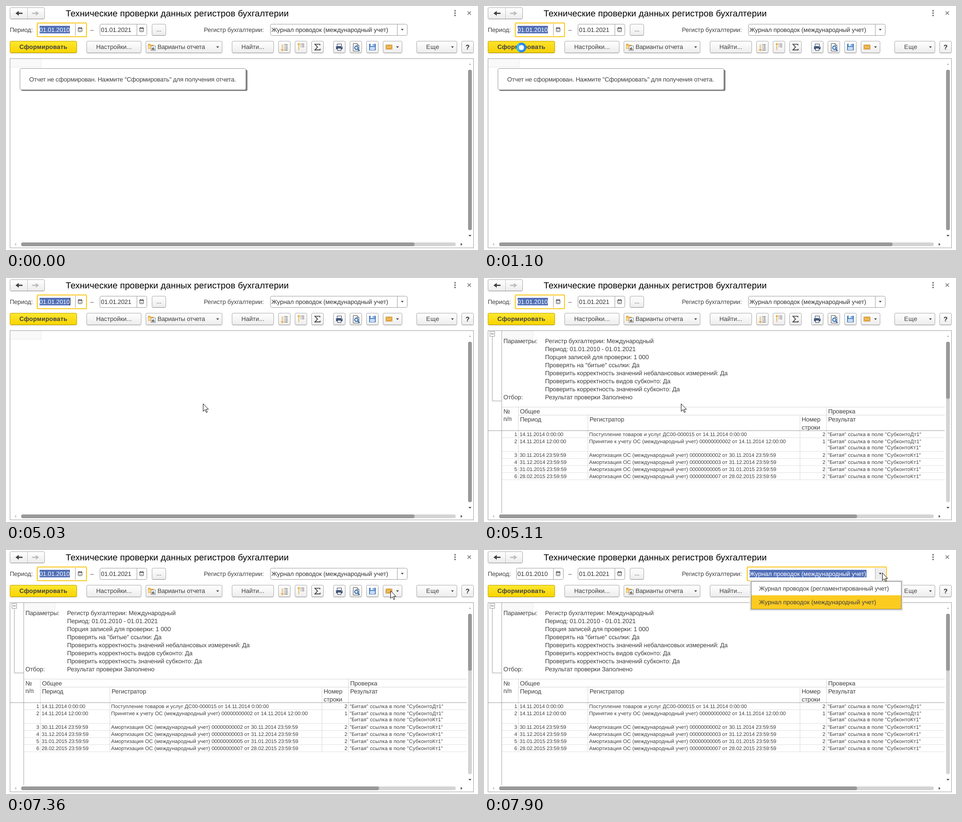
These frames come from a looping animation (997x517 px, 8000 ms). An HTML page:

```html
<!DOCTYPE html>
<html lang="ru">
<head>
<meta charset="utf-8">
<style>
html, body { margin: 0; width: 100%; height: 100%; overflow: hidden; background: #fff; }
svg { display: block; width: 997px; height: 517px; }
text { font-family: "Liberation Sans", Arial, sans-serif; font-size: 13px; fill: #404040; text-rendering: geometricPrecision; white-space: pre; }
</style>
</head>
<body>
<svg id="stage" viewBox="0 0 997 517" xmlns="http://www.w3.org/2000/svg"></svg>
<script>
const LOOP = 8000;
const JOURNAL = 'Журнал проводок (международный учет)';
const stage = document.getElementById('stage');

// Drawing helpers: each returns markup
const text = (x, y, s, { size = 13, ls = -0.1, anchor = 'start', fill = '#404040', bold = false } = {}) =>
  `<text x="${x}" y="${y}" text-anchor="${anchor}" letter-spacing="${ls}" style="font-size:${size}px;fill:${fill}${bold ? ';font-weight:700' : ''}">${s}</text>`;
const box = (x, y, x2, y2, fill, r = 0) =>
  `<rect x="${x}" y="${y}" width="${x2 - x}" height="${y2 - y}" rx="${r}" fill="${fill}"/>`;
const frame = (x, y, x2, y2, stroke, fill = '#fff', r = 0, w = 1) =>
  `<rect x="${x + w / 2}" y="${y + w / 2}" width="${x2 - x - w}" height="${y2 - y - w}" rx="${r}" fill="${fill}" stroke="${stroke}" stroke-width="${w}"/>`;
const path = (d, stroke, w = 1, fill = 'none') =>
  `<path d="${d}" fill="${fill}" stroke="${stroke}" stroke-width="${w}"/>`;
const shape = (d, fill) => `<path d="${d}" fill="${fill}"/>`;
const group = (id, body) => `<g id="${id}">${body}</g>`;
const down = (x, y, fill = '#444') => shape(`M${x - 3} ${y - 1.5}h6l-3 3.5z`, fill);
// Digits sit a little tighter than letters in the small table type
const tightDigits = s => s.replace(/\d+/g, '<tspan letter-spacing="-.12">$&</tspan>');

const button = (x, x2, y = 74, y2 = 100) =>
  frame(x, y, x2, y2, '#ababab', 'url(#grey)', 2.5) +
  path(`M${x + 2} ${y2 - .5}H${x2 - 2}`, '#8b8b8b');
const field = (x, x2, split) =>
  frame(x, 38, x2, 63, '#a0a0a0', '#fff', 3) + path(`M${split}.5 38V63`, '#a0a0a0');
const calendar = x =>
  frame(x, 46, x + 9, 55, '#444', '#fff', 1) + box(x, 46, x + 9, 48, '#444') +
  path(`M${x + 2.5} 44.5v2M${x + 6.5} 44.5v2`, '#444') +
  path(`M${x + 2} 50.5h5.5M${x + 2} 52.5h5.5`, '#555').replace('/>', ' stroke-dasharray="1 1"/>');

function defs() {
  const grad = (id, a, b) =>
    `<linearGradient id="${id}" x2="0" y2="1"><stop stop-color="${a}"/><stop offset="1" stop-color="${b}"/></linearGradient>`;
  return '<defs>' + grad('grey', '#ffffff', '#ececec') + grad('gold', '#ffe830', '#f8d400') +
    grad('goldHover', '#ffe22a', '#f3d007') + grad('goldDown', '#e3bd00', '#eecb08') + '</defs>';
}

function titleBar() {
  const arrow = (x, dir, c) =>
    path(`M${x} 15.5h${12 * dir}`, c, 2.6) +
    shape(`M${x + 15 * dir} 15.5l${-7 * dir} -5v10z`, c);
  return button(8, 82, 3, 28) + path('M45.5 4V27', '#c4c4c4') +
    arrow(35, -1, '#404040') + arrow(55, 1, '#bdbdbd') +
    text(126, 22, 'Технические проверки данных регистров бухгалтерии', { size: 18.7, ls: .07, fill: '#000' }) +
    [10, 15, 20].map(y => box(947, y - 1.5, 950, y + 1.5, '#666', 1)).join('') +
    path('M975 11.5l7 7m0 -7l-7 7', '#666', 1.2);
}

function periodRow() {
  return text(8, 55, 'Период:') +
    group('dateIdle', field(68, 168, 146) + text(70.5, 55, '01.01.2010', { fill: '#333' })) +
    group('dateFocus',
      frame(65, 35, 171, 66, '#f9cb25', '#fff', 1, 2) + path('M146.5 38V63', '#a0a0a0') +
      box(71, 42, 135, 58, '#5270b8') + text(70.5, 55, '01.01.2010', { fill: '#fff' })) +
    calendar(152) + text(178, 55, '–') +
    field(198, 298, 276) + text(200.5, 55, '01.01.2021', { fill: '#333' }) + calendar(282) +
    button(308, 338, 38, 63) + text(323, 54, '...', { anchor: 'middle' }) +
    text(418, 55, 'Регистр бухгалтерии:') +
    group('regIdle', field(558, 848, 826) + text(560.5, 55, JOURNAL, { ls: -.02, fill: '#333' })) +
    group('regFocus',
      frame(555, 35, 851, 66, '#f9cb25', '#fff', 1, 2) + box(827, 38, 848, 63, '#ededed') +
      path('M826.5 38V63', '#b0b0b0') + box(561, 42, 808, 58, '#5270b8') +
      text(560.5, 55, JOURNAL, { ls: -.02, fill: '#fff' })) +
    down(837, 50) +
    box(71, 42, 72, 58, '#222').replace('/>', ' id="caret"/>');
}

function sortIcon(x, up) {
  const y = up ? 79 : 81;
  const dir = up ? -1 : 1;
  const tip = up ? 79 : 95;
  const rows = up ? [80, 83, 86] : [81, 84, 87, 90, 93];
  return path(`M${x + 8.5} ${y}v14`, '#e8a52c', 1.4) +
    shape(`M${x + 8.5} ${tip + dir}l-3 ${-4 * dir}h6z`, '#e8a52c') +
    rows.map((r, i) => path(`M${x + 12} ${r + .5}h1.5M${x + (i % 4 ? 15 : 14)} ${r + .5}h${i % 4 ? 5 : 6}`, '#555', 1.2)).join('');
}

function toolIcons() {
  const variants =
    shape('M300 80h5l1 2h6v9h-12z', '#e9b44c') + shape('M301 84h10v6h-10z', '#f8d98c') +
    frame(306, 84, 316, 95, '#8a8a8a', '#fff') + box(308, 89, 310, 93, '#d0503c') +
    box(310, 87, 312, 93, '#4878b8') + box(312, 90, 314, 93, '#58a050');
  const printer =
    frame(699, 80, 709, 86, '#3a4a6a', '#fff') + box(697, 85, 711, 92, '#46587c', 2) +
    frame(700, 89, 708, 95, '#3a4a6a', '#fff') + box(708, 86, 710, 87, '#fff');
  const preview =
    path('M733.5 79.5h8l4 4v12h-12z', '#555', 1, '#fff') + path('M741.5 79.5v4h4', '#555') +
    '<circle cx="740" cy="88.5" r="3.6" fill="#cfe2fa" stroke="#2562a8" stroke-width="1.8"/>' +
    path('M742.8 91.3l4 4', '#2562a8', 2.2);
  const floppy =
    box(767, 80, 781, 94, '#4a80c8', 1) + box(770, 80, 778, 85, '#eaf1fb') + box(775, 81, 777, 84, '#4a80c8') +
    box(769, 87, 779, 93, '#eaf1fb') + path('M770 89h8M770 91h8', '#8fb2e0', .8);
  const mail = frame(802, 82, 816, 92, '#c08a28', '#e9a93a') +
    path('M803 83l6 5l6 -5M803 91l4 -4M815 91l-4 -4', '#fbe3b0', .9);
  return variants + sortIcon(575, false) + sortIcon(610, true) +
    path('M663 83.5V81H652.5l5.5 6l-5.5 6.2H663.5V90.5', '#444', 1.7) +
    printer + preview + floppy + mail;
}

function toolbar() {
  const spans = [[170, 286], [295, 457], [477, 566], [575, 601], [610, 636], [645, 671],
    [691, 717], [726, 752], [761, 787], [796, 837], [867, 953], [962, 988]];
  const mid = { anchor: 'middle', ls: .05 };
  return frame(8, 74, 150, 100, '#bfa100', 'url(#gold)', 2.5).replace('/>', ' id="run"/>') +
    path('M10 99.5H148', '#9a8200') +
    text(79, 91, 'Сформировать', { anchor: 'middle', ls: .2, bold: true }) +
    spans.map(s => button(...s)).join('') + toolIcons() +
    text(228, 91, 'Настройки...', mid) + text(320, 91, 'Варианты отчета', { ls: -.2 }) +
    text(521.5, 91, 'Найти...', mid) + text(887.5, 91, 'Еще', { ls: .5 }) +
    text(975, 92, '?', { anchor: 'middle', size: 14, bold: true, fill: '#222' }) +
    down(447, 87) + down(827, 87) + down(943, 87);
}

function sheet() {
  const bar = (x, y, x2, y2, c) => box(x, y, x2, y2, c, 4);
  return frame(8, 111, 988, 513, '#a0a0a0') +
    bar(976, 135, 984, 475, '#d4d4d4') + bar(32, 501, 950, 509, '#d4d4d4') +
    bar(976, 135, 984, 475, '#999').replace('/>', ' id="thumbV"/>') +
    bar(32, 501, 863, 509, '#999').replace('/>', ' id="thumbH"/>') +
    shape('M977 125h6l-3 -3.5z', '#c4c4c4') + down(980, 486.5) +
    shape('M21.5 502v6l-3.5 -3z', '#c4c4c4') + shape('M960.5 502v6l3.5 -3z', '#444') +
    group('blank', box(9, 112, 74, 129, '#f9f9f9') + path('M9 129.5H74.5V112', '#eaeaea')) +
    group('notice', box(32, 135, 510, 180, '#808080', 3) + frame(29, 132, 507, 178, '#999', '#fff', 3) +
      text(49, 160, 'Отчет не сформирован. Нажмите "Сформировать" для получения отчета.', { ls: -.15 })) +
    group('report', report());
}

function report() {
  const params = ['Регистр бухгалтерии: Международный', 'Период: 01.01.2010 - 01.01.2021',
    'Порция записей для проверки: 1 000', 'Проверять на "битые" ссылки: Да',
    'Проверить корректность значений небалансовых измерений: Да', 'Проверить корректность видов субконто: Да',
    'Проверить корректность значений субконто: Да', 'Результат проверки Заполнено'];
  const heads = [[41, 287, '№'], [41, 303, 'п/п'], [76, 287, 'Общее'], [76, 304, 'Период'], [223, 304, 'Регистратор'],
    [671, 304, 'Номер'], [671, 321, 'строки'], [727, 287, 'Проверка'], [727, 304, 'Результат']];
  const asset = 'ОС (международный учет) 0000000000';
  const wear = (n, date) => [date + ' 23:59:59', `Амортизация ${asset}${n} от ${date} 23:59:59`, 2, 'Кт'];
  const rows = [
    ['14.11.2014 0:00:00', 'Поступление товаров и услуг ДС00-000015 от 14.11.2014 0:00:00', 2, 'Дт'],
    ['14.11.2014 12:00:00', `Принятие к учету ${asset}2 от 14.11.2014 12:00:00`, 1, 'Дт'],
    wear(2, '30.11.2014'), wear(3, '31.12.2014'), wear(5, '31.01.2015'), wear(7, '28.02.2015')];
  const small = { size: 11, ls: .08 };
  const right = { size: 11, ls: 0, anchor: 'end' };
  const broken = (y, side) => text(726, y, `"Битая" ссылка в поле "Субконто${side}1"`, { size: 11, ls: .18 });
  const rowY = i => 335 + 15 * i + (i > 1 ? 14 : 0);
  return path('M37.5 112V498', '#a8a8a8') + frame(12, 113, 23, 124, '#999') + path('M14.5 118.5h6', '#444') +
    path('M17.5 124V260.5H37', '#a0a0a0') +
    box(38, 112, 103, 128, '#f9f9f9') + path('M38 128.5H103.5V112', '#eaeaea') +
    text(41, 138, 'Параметры:') + text(41, 257, 'Отбор:') +
    params.map((s, i) => text(129, 138 + 17 * i, s)).join('') +
    path('M38 273.5H973M72 290.5H973M72.5 273V427M219.5 290V427M667.5 290V427M723.5 273V427', '#d8d8d8') +
    path([338, 367, 382, 397, 412, 427].map(y => `M38 ${y}.5H973`).join(''), '#e2e2e2') +
    path('M9 323.5H973', '#a0a0a0') +
    heads.map(h => text(...h)).join('') +
    rows.map(([when, doc, line, side], i) => {
      const y = rowY(i);
      return text(70, y, i + 1, right) + text(75.3, y, when, { size: 11, ls: -.1 }) +
        text(222, y, tightDigits(doc), small) + text(721, y, line, right) + broken(y, side);
    }).join('') + broken(363, 'Кт');
}

function popup() {
  return box(561, 64, 885, 129, '#e4e4e4', 2) + frame(564, 66, 882, 126, '#777') +
    box(565, 96, 881, 125, '#fbcb20') +
    text(581, 86, 'Журнал проводок (регламентированный учет)') +
    text(581, 115, JOURNAL, { ls: 0 });
}

stage.innerHTML = defs() + titleBar() + periodRow() + toolbar() + sheet() + group('popup', popup()) +
  group('arrow', path('M.5 .5V16.5L4.3 13L7 19L9.3 18L6.7 12.2H11.6Z', '#111', 1, '#fff')) +
  group('spin', '<circle r="8" fill="#fff" stroke="#2b8aee" stroke-width="5"/>' +
    path('M-4 6.9A8 8 0 0 1 -4 -6.9', '#35bdf4', 5));

const el = {};
stage.querySelectorAll('[id]').forEach(n => { el[n.id] = n; });
const show = (id, on) => el[id].setAttribute('visibility', on ? 'visible' : 'hidden');
const place = (id, [x, y]) => el[id].setAttribute('transform', `translate(${Math.round(x)} ${Math.round(y)})`);
const mix = (a, b, p) => a.map((v, i) => v + (b[i] - v) * p);
const ease = p => p * p * (3 - 2 * p);
// Number of steps already taken out of n, spread evenly from a to b
const taken = (t, a, b, n) =>
  t < a ? 0 : Math.min(n, Math.floor((t - a + 1) / ((b - a) / (n - 1))) + 1);

const ENTRY = [725, 386], RUN = [79, 88], REST = [416, 266];
const SWEEP = [REST, [424, 282], [465, 332], [533, 366], [602, 372], [672, 330], [736, 240], [785, 150],
  [812, 86], [829, 62], [838, 51], [841, 48]];

function pointer(t) {
  if (t < 1330) return mix(ENTRY, RUN, ease(Math.max(0, taken(t, 70, 610, 8) - 1) / 7));
  if (t < 5030) return mix(RUN, REST, ease(taken(t, 1330, 1850, 8) / 8));
  return SWEEP[taken(t, 6820, 7590, 11)];
}

function draw(t) {
  const waiting = t >= 1100 && t < 5030;
  const ready = t >= 5110;
  const choosing = t >= 7670;
  const at = pointer(t);
  place('arrow', at);
  place('spin', at);
  show('arrow', t >= 70 && !waiting);
  show('spin', waiting);

  const over = at[0] < 150 && at[1] < 100;
  const pressed = t >= 930 && t < 1100;
  el.run.setAttribute('fill', `url(#${pressed ? 'goldDown' : over ? 'goldHover' : 'gold'})`);

  show('notice', t < 5030);
  show('blank', !ready);
  show('report', ready);
  el.thumbV.setAttribute('height', ready ? 121 : 340);
  el.thumbH.setAttribute('width', ready ? 756 : 831);

  show('dateFocus', !choosing);
  show('dateIdle', choosing);
  show('regFocus', choosing);
  show('regIdle', !choosing);
  const blink = Math.floor((t - 5020) / 550) % 2 === 1;
  show('caret', t >= 5030 && !choosing && (!ready || blink));
  el.caret.setAttribute('x', ready ? 71 : 135);

  show('popup', t >= 7750);
  el.popup.setAttribute('opacity', taken(t, 7750, 7900, 3) / 3);
}

const start = performance.now();
function tick() {
  draw((performance.now() - start) % LOOP);
  requestAnimationFrame(tick);
}
draw(0);
requestAnimationFrame(tick);
</script>
</body>
</html>
```
